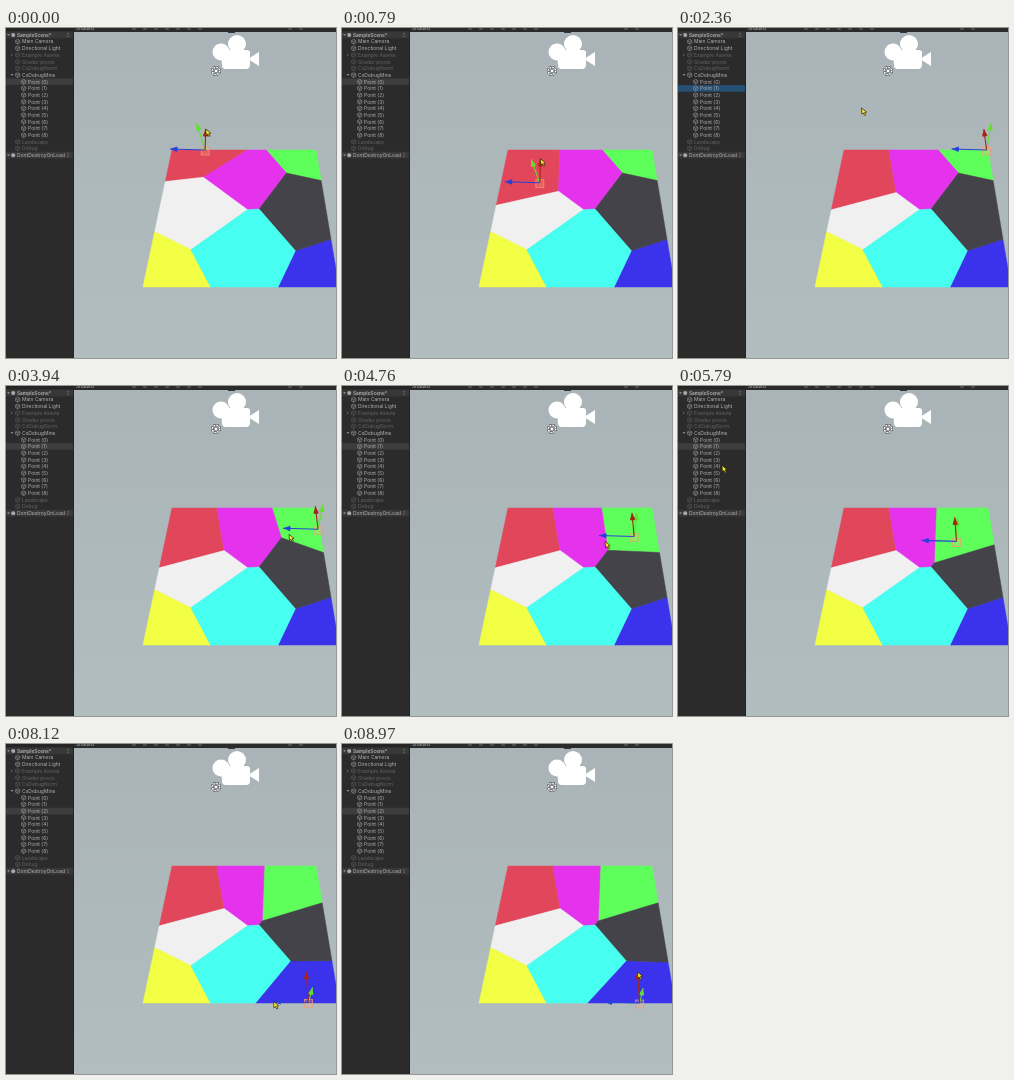
These frames come from a looping animation (330x330 px, 9 s). An HTML page:

```html
<!DOCTYPE html>
<html lang="en">
<head>
<meta charset="utf-8">
<title>Voronoi scene</title>
<style>
  html, body { margin: 0; width: 100%; height: 100%; overflow: hidden; background: #2b2b2b; }
  svg { display: block; width: 100vw; height: 100vh; }
  text { font: 5px Inter, "Open Sans", sans-serif; fill: #b2b2b2; }
  .off { opacity: .42; }
  .bold { font-weight: 600; font-size: 4.8px; }
  .cube { fill: none; stroke: #999; stroke-width: .6; }
</style>
</head>
<body>
<svg viewBox="0 0 330 330" preserveAspectRatio="none">
  <defs>
    <linearGradient id="sky" x2="0" y2="1">
      <stop offset="0" stop-color="#aab4b8"/>
      <stop offset="1" stop-color="#b1bdbe"/>
    </linearGradient>
    <clipPath id="view"><rect x="68" width="262" height="330"/></clipPath>
  </defs>
  <rect x="68" width="262" height="330" fill="url(#sky)"/>

  <g clip-path="url(#view)">
    <g id="cells" stroke-width=".5" stroke-linejoin="round"></g>
    <path d="M222 5v-2h7v2z" fill="#35393b"/>
    <g id="camera" fill="#fff">
      <circle cx="231" cy="16" r="9"/>
      <circle cx="215" cy="24" r="8.500"/>
      <path d="M215 22h26q3 0 3 3v12q0 4-4 4h-20q-4 0-4-4zM242 31l11-7v14z"/>
    </g>
    <g fill="none">
      <circle cx="210" cy="43" r="3.600" stroke="#33383a" stroke-width="2.800" stroke-dasharray="1.900 .93"/>
      <circle cx="210" cy="43" r="3.600" stroke="#fff" stroke-width="1.700" stroke-dasharray="1.500 1.330"/>
      <circle cx="210" cy="43" r="1.700" fill="#fff" stroke="#555" stroke-width=".5"/>
    </g>
    <g id="gizmo">
      <rect id="pivot" width="8" height="8" fill="#f8b58044" stroke="#f19a72" stroke-width=".7"/>
    </g>
    <rect x="68" width="262" height="4" fill="#2b2b2b"/>
    <text x="70" y="2">Shaded</text>
    <path d="M126 1h72M282 1h22" stroke="#6d6d6d" stroke-dasharray="4 7"/>
  </g>

  <rect width="68" height="330" fill="#2b2b2b"/>
  <rect width="68" height="3" fill="#252525"/>
  <rect id="mark" width="67" height="6.600"/>
  <g id="rows"></g>
  <path d="M67.500 0v330" stroke="#222"/>
  <path id="cursor" d="M0 0l.4 6.300 1.500-1.300 1.300 2.500 1.100-.6-1.200-2.400 2-.3z" fill="#f7e53c" stroke="#2a2600" stroke-width=".7"/>
</svg>
<script>
const LOOP = 9000;
const $ = id => document.getElementById(id);
const mix = (a, b, k) => a.map((v, i) => v + (b[i] - v) * k);
const progress = (t, from, to) => Math.min(1, Math.max(0, (t - from) / (to - from)));

function add(parent, tag, attrs, label) {
  const el = document.createElementNS('http://www.w3.org/2000/svg', tag);
  for (const key in attrs) el.setAttribute(key, attrs[key]);
  if (label) el.textContent = label;
  return parent.appendChild(el);
}

// Hierarchy list
const rowY = i => 7 + i * 6.675;
const FIRST_POINT = 7;
const labels = [
  'SampleScene*', 'Main Camera', 'Directional Light', 'Example Assets', 'Shader previs',
  'CsDebugNorm', 'CsDebugMine', ...Array.from({ length: 9 }, (_, i) => `Point (${i})`),
  'Landscape', 'Debug', 'DontDestroyOnLoad'
];
const disabled = /Assets|Shader|Norm|Landscape|Debug$/;
const fold = (x, y) => add($('rows'), 'path', { d: `M${x - 1.5} ${y - 1}h3l-1.500 2z`, fill: '#888' });

labels.forEach((label, i) => {
  const y = rowY(i), scene = i === 0 || i === labels.length - 1;
  const x = scene ? 11 : label.startsWith('Point') ? 22 : 16;
  if (scene) {
    add($('rows'), 'rect', { y: y - 3.3, width: 67, height: 6.6, fill: '#383838' });
    add($('rows'), 'circle', { cx: 7.2, cy: y, r: 2, fill: '#aaa' });
    add($('rows'), 'path', { d: `M62 ${y - 2}v4`, stroke: '#999', 'stroke-width': .8, 'stroke-dasharray': '.9 .6' });
    fold(2.5, y);
  }
  const g = add($('rows'), 'g', { class: disabled.test(label) ? 'off' : '' });
  add(g, 'text', { x, y: y + 1.8, class: i ? '' : 'bold' }, label);
  if (!scene) {
    add(g, 'path', {
      class: 'cube',
      d: `M${x - 4.3} ${y - 2.4}l2.100 1.200v2.400l-2.100 1.200-2.100-1.200v-2.400zm-2.100 1.200l2.100 1.200 2.100-1.200m-2.100 1.200v2.400`
    });
  }
});
fold(6, rowY(6));
add($('rows'), 'path', { d: `M5 ${rowY(3) - 1.5}l2 1.500-2 1.500z`, fill: '#555' });

// Plane seen in perspective: u, v in 0..1 to stage pixels
const FAR = 144, NEAR = 196;
function project([u, v]) {
  const w = 1 / (1 / FAR - v * (1 / FAR - 1 / NEAR));
  const s = (w - FAR) / (NEAR - FAR);
  return [166 - 29 * s + u * w, 122 + 137 * s];
}

// A site rests at home and is dragged from one place to the next.
const site = (color, home, ...drags) =>
  ({ home, drags, cell: add($('cells'), 'polygon', { fill: color, stroke: color }) });
const drag = (from, to, place) => ({ from, to, place });

const red = site('#e2465a', [.23, 0], drag(60, 880, [.25, .336]));
const green = site('#5fff5b', [.99, 0], drag(2800, 3550, [.99, .2]), drag(3950, 5300, [.763, .305]));
const blue = site('#3b32ec', [1.005, .98], drag(7360, 8240, [.82, 1]));
const sites = [
  red, green, blue,
  site('#e432ed', [.49, .292]),
  site('#f0f0f1', [.306, .497]),
  site('#434349', [.84, .511]),
  site('#f3ff45', [.03, 1.017]),
  site('#46fff0', [.516, .735])
];
const placeAt = ({ home, drags }, t) =>
  drags.reduce((p, d) => mix(p, d.place, progress(t, d.from, d.to)), home);

// Keep the part of the polygon nearer to p than to q.
function clip(poly, p, q) {
  const nx = q[0] - p[0], ny = q[1] - p[1];
  const mid = (nx * (p[0] + q[0]) + ny * (p[1] + q[1])) / 2;
  const side = a => a[0] * nx + a[1] * ny - mid;
  const out = [];
  poly.forEach((a, i) => {
    const b = poly[(i + 1) % poly.length], da = side(a), db = side(b);
    if (da <= 0) out.push(a);
    if (da * db < 0) out.push(mix(a, b, da / (da - db)));
  });
  return out;
}

function drawCells(t) {
  const at = sites.map(s => placeAt(s, t));
  sites.forEach(({ cell }, i) => {
    const poly = at.reduce((part, q, j) => j === i ? part : clip(part, at[i], q),
      [[0, 0], [1, 0], [1, 1], [0, 1]]);
    cell.setAttribute('points', poly.map(p => project(p).map(n => n.toFixed(2))).join(' '));
  });
}

// Selection: list focus lasts until the first drag of the site.
const selections = [
  { site: red, since: 0 },
  { site: green, since: 1850 },
  { site: blue, since: 6050 }
];
const selectedAt = t => selections.findLastIndex(s => t >= s.since);

// Axis tips follow from the place of the handle in the view.
const axes = {
  depth: { color: '#2941d8', tip: (x, y) => [x - 35, y - 1] },
  up: { color: '#62e02f', tip: (x, y, v) => [x + (x - 270) * .12, y - 27 + 12 * v] },
  side: { color: '#a52317', tip: (x, y, v) => [x - (x - 220) * .03, y - 21 - 10 * v] }
};
for (const axis of Object.values(axes)) {
  axis.line = add($('gizmo'), 'path', { stroke: axis.color, 'stroke-width': 1.1 });
  axis.head = add($('gizmo'), 'path', { d: 'M0 0l7-2.700q1.300 2.700 0 5.400z', fill: axis.color });
}
function tipAt(s, axis, t) {
  const place = placeAt(s, t);
  return axis.tip(...project(place), place[1]);
}

function drawGizmo(t) {
  const s = selections[selectedAt(t)].site;
  const [x, y] = project(placeAt(s, t));
  $('pivot').setAttribute('transform', `translate(${x - 4} ${y - 3})`);
  for (const axis of Object.values(axes)) {
    const [tx, ty] = tipAt(s, axis, t);
    const turn = Math.atan2(y - ty, x - tx) * 180 / Math.PI;
    axis.line.setAttribute('d', `M${x} ${y}L${tx} ${ty}`);
    axis.head.setAttribute('transform', `translate(${tx} ${ty}) rotate(${turn})`);
  }
}

// The pointer glides between spots and sticks to a handle being dragged.
const onRow = i => () => [35, rowY(i) - 6];
const onAxis = (s, axis) => t => tipAt(s, axis, t);
const glides = [
  { from: 0, to: 1, spot: onAxis(red, axes.side) },
  { from: 980, to: 1600, spot: onRow(FIRST_POINT + 1) },
  { from: 1950, to: 2700, spot: onAxis(green, axes.side) },
  { from: 3600, to: 3900, spot: t => mix(onAxis(green, axes.depth)(t), [300, 160], .5) },
  { from: 5400, to: 5750, spot: () => [44, rowY(FIRST_POINT + 4) - 1] },
  { from: 5850, to: 6050, spot: onRow(FIRST_POINT + 2) },
  { from: 6350, to: 7050, spot: onAxis(blue, axes.depth) },
  { from: 8350, to: 8750, spot: onAxis(blue, axes.side) }
];
// On the depth handle the pointer rides just behind the tip.
glides[3].spot = t => onAxis(green, axes.depth)(t).map(n => n + 6);
const pointerAt = t =>
  glides.reduce((p, g) => mix(p, g.spot(t), progress(t, g.from, g.to)), [0, 0]);

function drawMark(t) {
  const i = selectedAt(t), { site, since } = selections[i];
  const focus = since > 0 && t < site.drags[0].from;
  $('mark').setAttribute('y', rowY(FIRST_POINT + i) - 3.3);
  $('mark').setAttribute('fill', focus ? '#254f74' : '#3d3d3d');
}

function draw(t) {
  drawCells(t);
  drawGizmo(t);
  drawMark(t);
  $('cursor').setAttribute('transform', `translate(${pointerAt(t).join(' ')})`);
}

const start = performance.now();
function tick() {
  draw((performance.now() - start) % LOOP);
  requestAnimationFrame(tick);
}
tick();
</script>
</body>
</html>
```
